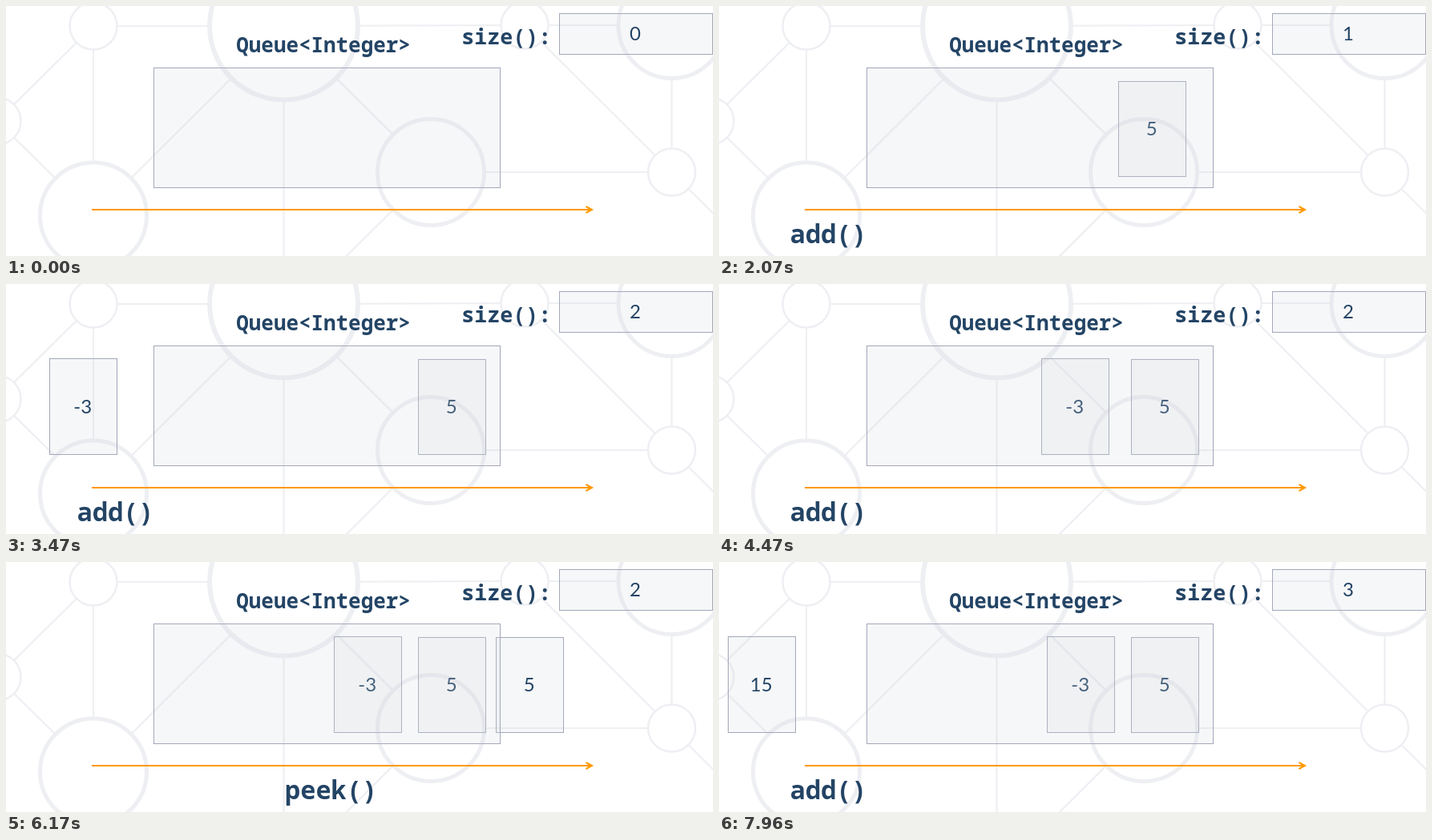
An HTML page with a canvas for the animation above (8 s loop, 882 by 313 pixels).

```html
<!DOCTYPE html>
<html lang="en">
<head>
<meta charset="utf-8">
<title>Queue</title>
<style>
html, body { margin: 0; width: 100%; height: 100%; overflow: hidden; background: #fff; }
canvas { display: block; }
</style>
</head>
<body>
<canvas id="stage" width="882" height="313"></canvas>
<script>
const ctx = document.getElementById('stage').getContext('2d');
const LOOP = 8000, START = 520, STEP = 77.5, FADE = 500;
const INK = '#234465', EDGE = '#a3a8ba', NET = '#eeeff3', GLASS = 'rgba(208,212,220,0.2)';
const MONO = '"Noto Sans Mono", "DejaVu Sans Mono", monospace';
const DIGITS = 'Lato, "Open Sans", sans-serif';

const node = (x, y, r) => ({ x, y, r });
const SMALL = 29.5, MEDIUM = 66.5, LARGE = 92.5;

// Background network; each chain joins its nodes in order
const a = node(109, 25, SMALL), b = node(346.5, 25, LARGE), c = node(647, 24, SMALL);
const d = node(830.5, 24, MEDIUM), e = node(-11, 144, SMALL), f = node(109, 262.5, MEDIUM);
const g = node(530, 208, MEDIUM), h = node(830.5, 208, SMALL);
const below = ({ x, y }, dx) => node(x + dx, y + 120, 0);
const chains = [
  [a, b, c, d, h, g, b, f, e, a, f],
  [c, h, below(h, 120)],
  [b, g, below(g, -120)],
  [b, node(b.x, 330, 0)]
];

// `at` starts the fade; the card moves from `start`, gaining speed for `rise` ms
// and losing it for `fall` ms
const operations = [
  { call: 'add()', size: 1, card: '5', at: 480, from: 0, to: 514, start: 515, rise: 1000, fall: 761 },
  { call: 'add()', size: 2, card: '-3', at: 2940, from: 0, to: 409, start: 3108, rise: 642, fall: 875 },
  { call: 'peek()', size: 2, card: '5', at: 5200, from: 514, to: 691, start: 5250, rise: 884, fall: 884 },
  { call: 'add()', size: 3, card: '15', at: 7430, from: 0, to: 304, start: 7765, rise: 700, fall: 800 }
];

const clamp = v => Math.max(0, Math.min(1, v));
const fadeIn = (at, t) => clamp((t - at) / FADE);

function progress({ start, rise, fall }, t) {
  const total = rise + fall, dt = clamp((t - start) / total) * total;
  return dt < rise ? dt * dt / (rise * total) : 1 - (total - dt) ** 2 / (fall * total);
}

function line(color, width, ...points) {
  ctx.strokeStyle = color;
  ctx.lineWidth = width;
  ctx.beginPath();
  points.forEach(({ x, y }) => ctx.lineTo(x, y));
  ctx.stroke();
}

function ring({ x, y, r }) {
  ctx.fillStyle = '#fff';
  ctx.strokeStyle = NET;
  ctx.lineWidth = r === SMALL ? 2.5 : r === MEDIUM ? 5 : 6;
  ctx.beginPath();
  ctx.arc(x, y, r, 0, Math.PI * 2);
  ctx.fill();
  ctx.stroke();
}

function pane(x, y, w, h) {
  ctx.fillStyle = GLASS;
  ctx.fillRect(x, y, w, h);
  ctx.strokeStyle = EDGE;
  ctx.lineWidth = 1;
  ctx.strokeRect(x + 0.5, y + 0.5, w - 1, h - 1);
}

function text(str, x, y, font, align = 'left') {
  ctx.font = font;
  ctx.textAlign = align;
  ctx.fillStyle = INK;
  ctx.fillText(str, x, y);
}

const code = (str, x, y, px) => text(str, x, y, `bold ${px}px ${MONO}`);
const number = (str, x, y) => text(str, x, y, `24px ${DIGITS}`, 'center');

function faded(alpha, paint) {
  if (alpha <= 0) return;
  ctx.globalAlpha = alpha;
  paint();
  ctx.globalAlpha = 1;
}

function drawCard(op, alpha, t) {
  faded(alpha, () => {
    const x = Math.round(op.from + (op.to - op.from) * progress(op, t));
    const top = op.card === '5' ? 94 : 93;
    pane(x, top, 85, 214 - top);
    number(op.card, x + 41.7, 162);
  });
}

function draw(t) {
  ctx.fillStyle = '#fff';
  ctx.fillRect(0, 0, 882, 313);
  chains.forEach(chain => line(NET, 2.2, ...chain));
  [a, b, c, d, e, f, g, h].forEach(ring);

  // How far each operation has appeared, and how far the next has replaced it
  const shown = operations.map(op => fadeIn(op.at, t));
  const current = shown.map((s, i) => s * (1 - (shown[i + 1] || 0)));

  // A peeked card leaves with its operation; added cards stay
  operations.forEach((op, i) => drawCard(op, op.call === 'peek()' ? current[i] : shown[i], t));

  // The queue is a tinted sheet above the cards
  pane(184, 77, 433, 151);
  pane(690, 9, 192, 52);
  code('Queue<Integer>', 287.3, 58, 25.9);
  code('size():', 568.3, 48, 26.7);

  faded(1 - shown[0], () => number('0', 785, 43));
  operations.forEach((op, i) => faded(current[i], () => {
    number(op.size, 785, 43);
    code(op.call, op.call === 'peek()' ? 348 : 88.5, 297, 32);
  }));

  const tip = { x: 731, y: 255 };
  line('#ff9900', 2, { x: 107, y: 255 }, tip);
  line('#ff9900', 2, { x: 723.5, y: 251 }, tip, { x: 723.5, y: 259 });
}

function tick() {
  const t = performance.now() % LOOP;
  draw(t < START ? 0 : START + Math.floor((t - START + 30) / STEP) * STEP);
  requestAnimationFrame(tick);
}
tick();
</script>
</body>
</html>
```
